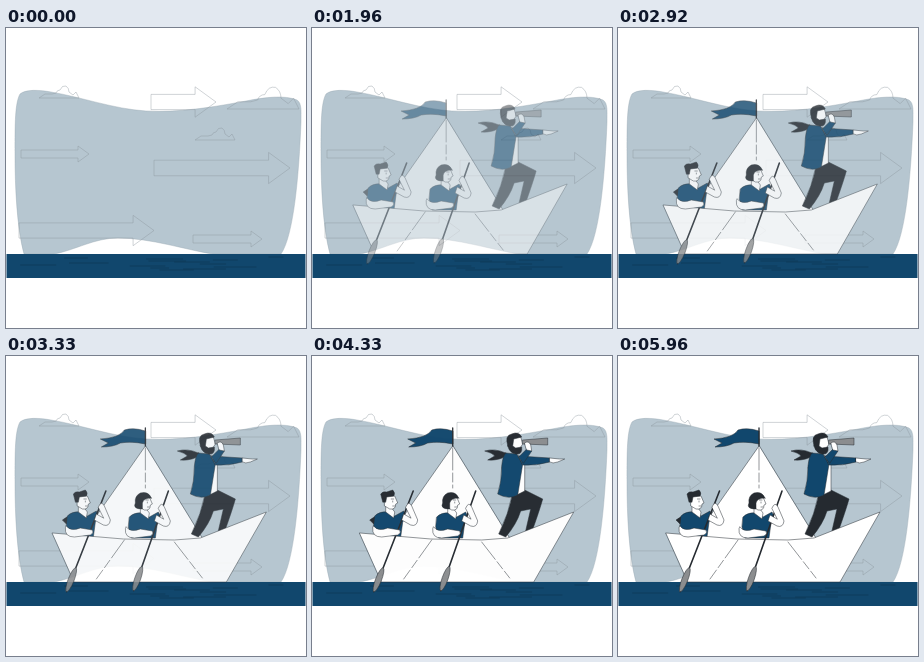
Write an HTML page that moves like this. It is 300x300 px and loops after 6 s.

```html
<!DOCTYPE html>
<html lang="en">
<head>
<meta charset="utf-8">
<title>Paper boat</title>
<style>
  html, body { margin: 0; width: 100%; height: 100%; overflow: hidden; background: #fff; }
  svg { display: block; width: 100vw; height: 100vh; }
  #sky { fill: none; stroke: #8a949a; stroke-width: .4; }
  #boat { fill: #fff; stroke: #252a30; stroke-width: .5; stroke-linejoin: round; stroke-linecap: round; }
  .navy { fill: #11476d; }
  .ink { fill: #252a30; }
  .grey { fill: #8b8d8f; }
  .fold { fill: none; }
  .dash { stroke-dasharray: 22 3 9 3; }
</style>
</head>
<body>
<svg viewBox="0 0 300 300">
  <defs>
    <path id="cloud" vector-effect="non-scaling-stroke" d="M0 0L6 -4L13 -4L17 -5Q18 -8 21 -8Q23 -13 27 -12Q30 -10 30 -6L34 -3L37 -6L40 0Z"/>
    <g id="rower">
      <path class="navy" d="M63 160Q68 155 76 156L83 160L92 155Q95 160 91 166L89 181H65L62 170Z"/>
      <path d="M74 150V156L82 162L83 156L80 152Z"/>
      <path d="M73 140H83L86 147L84 148Q84 154 78 153L73 150Z"/>
      <path class="fold" d="M79.5 143H82M81 145v1M81 150h2"/>
    </g>
    <g id="arms">
      <path d="M94 151Q97 144 100 150L106 164Q105 171 99 169L90 164L92 158L99 162Z"/>
      <path d="M62 170Q66 176 76 172L88 174Q90 177 86 179L70 181Q60 181 61 172Z"/>
    </g>
  </defs>

  <path d="M18 226C11 200 9 160 9 126C9 95 9 75 14 66C20 61 34 62 45 64C75 69 108 81 140 83C175 85 213 78 240 73C260 69 279 67 291 72C296 75 295 84 295 94C293 145 288 207 275 226H207C180 222 145 210 112 210C88 210 70 222 48 226Z" fill="#b6c6d0" stroke="#98a7b1" stroke-width=".4"/>
  <g id="sky">
    <use href="#cloud" transform="translate(33 70)"/>
    <use href="#cloud" transform="translate(189 112)"/>
    <use href="#cloud" transform="translate(221 81) scale(1.8)"/>
  </g>
  <path class="navy" d="M.5 226h299v24H.5z"/>
  <g id="waves" stroke="#0c3350" stroke-width=".6"></g>

  <g id="boat">
    <!-- sail and flag -->
    <path d="M141 90L78 180L119 186H200Z"/>
    <path class="fold dash" d="M141 92V132"/>
    <path class="navy" d="M141 75Q129 71 120 74Q115 82 96 83L104 87L97 91Q109 91 116 87Q127 85 141 88Z"/>
    <path class="fold" d="M141 72V90" stroke-width="1.3"/>

    <!-- lookout -->
    <path class="ink" d="M201 137L213 134L231 143Q228 154 219 179H213L219 153L209 155Q205 168 194 181L187 178Q197 158 201 137Z"/>
    <path class="ink" d="M194 97Q183 92 173 95Q181 97 183 100L176 104Q188 105 196 99Z"/>
    <path d="M204 98L213 104V135L203 140Z"/>
    <path class="navy" d="M194 97L205 98L211 108L206 139Q197 144 186 138Q190 126 190 110Q191 100 194 97Z"/>
    <path class="navy" d="M207 100L238 102V106Q225 110 211 109Z"/>
    <path d="M238 102L248 103H253L246 106Q241 108 238 106Z"/>
    <path d="M200 80L209 81L211 88L207 94H198Z"/>
    <path class="ink" d="M196 90Q193 79 200 78Q207 75 210 81L202 83L201 90L204 92L210 91Q211 99 204 98Q198 97 196 90Z"/>
    <path class="grey" d="M211 84L236 82V89L211 88Z"/>
    <path class="navy" d="M207 101L215 93L220 95L212 107Z"/>
    <path d="M213 87Q217 84 219 89L220 95L215 94Z"/>

    <!-- rowers -->
    <path class="ink" d="M72 158Q64 159 58 164L62 168Q69 165 74 160Z"/>
    <use href="#rower"/>
    <use href="#rower" x="62" y="1"/>
    <path class="ink" d="M71 146L69 138Q71 135 75 136L81 134Q84 137 82 140L75 141L74 146Z"/>
    <path class="ink" d="M147 142Q144 135 136 137Q130 140 131 147Q128 153 138 153V147Q139 142 147 142Z"/>

    <!-- hull -->
    <path d="M48 177L119 183L170 184L196 182L262 156L222 226H70Z"/>
    <path class="fold dash" d="M120 184L92 223M170 186L198 222"/>

    <g id="oars"></g>
    <use href="#arms"/>
    <use href="#arms" x="60" y="1"/>
  </g>
</svg>
<script>
const LOOP = 6000, START = 700, SLIDE = 4500, SHIFT = 13;
const $ = id => document.getElementById(id);

function arrow(x, y, length, size) {
  const shaft = 4 * size, head = 8 * size, tip = x + length, neck = tip - 11 * size;
  return `<path d="M${x} ${y - shaft}H${neck}V${y - head}L${tip} ${y}L${neck} ${y + head}V${y + shaft}H${x}Z"/>`;
}
$('sky').innerHTML += arrow(145, 74, 65, 1.9) + arrow(148, 140, 136, 1.95) + arrow(13, 202.5, 135, 1.9) +
  arrow(15, 126, 68, 1) + arrow(187, 211, 69, 1);

// Short ripples scattered over the water
let seed = 7;
const random = () => (seed = seed * 16807 % 2147483647) / 2147483647;
for (let i = 0; i < 14; i++) {
  const w = 15 + 30 * random(), x = random() * (300 - w), y = 229 + i;
  $('waves').innerHTML += `<path d="M${x} ${y}h${w}"/>`;
}

// Oar from the grip (x, y) down to the blade tip (tx, ty)
function oar(x, y, tx, ty) {
  const length = Math.hypot(tx - x, ty - y), angle = Math.atan2(ty - y, tx - x) * 180 / Math.PI;
  return `<g transform="translate(${x} ${y}) rotate(${angle})">
    <path d="M0 0H${length - 26}" stroke-width="1.6"/>
    <ellipse class="grey" cx="${length - 13}" rx="13" ry="3"/></g>`;
}
$('oars').innerHTML = oar(101.5, 135, 62, 236) + oar(164, 135, 129, 235);

// Cubic Bezier easing (.25, .1, .25, 1)
function ease(x) {
  let lo = 0, hi = 1, s;
  const curve = (a, b) => 3 * (1 - s) ** 2 * s * a + 3 * (1 - s) * s * s * b + s ** 3;
  for (let i = 0; i < 24; i++) {
    s = (lo + hi) / 2;
    if (curve(.25, .25) < x) lo = s; else hi = s;
  }
  return curve(.1, 1);
}

function draw() {
  const t = performance.now() % LOOP;
  const p = ease(Math.min(1, Math.max(0, (t - START) / SLIDE)));
  $('boat').setAttribute('opacity', p);
  $('boat').setAttribute('transform', `translate(${-SHIFT * (1 - p)} 0)`);
  requestAnimationFrame(draw);
}
draw();
</script>
</body>
</html>
```
